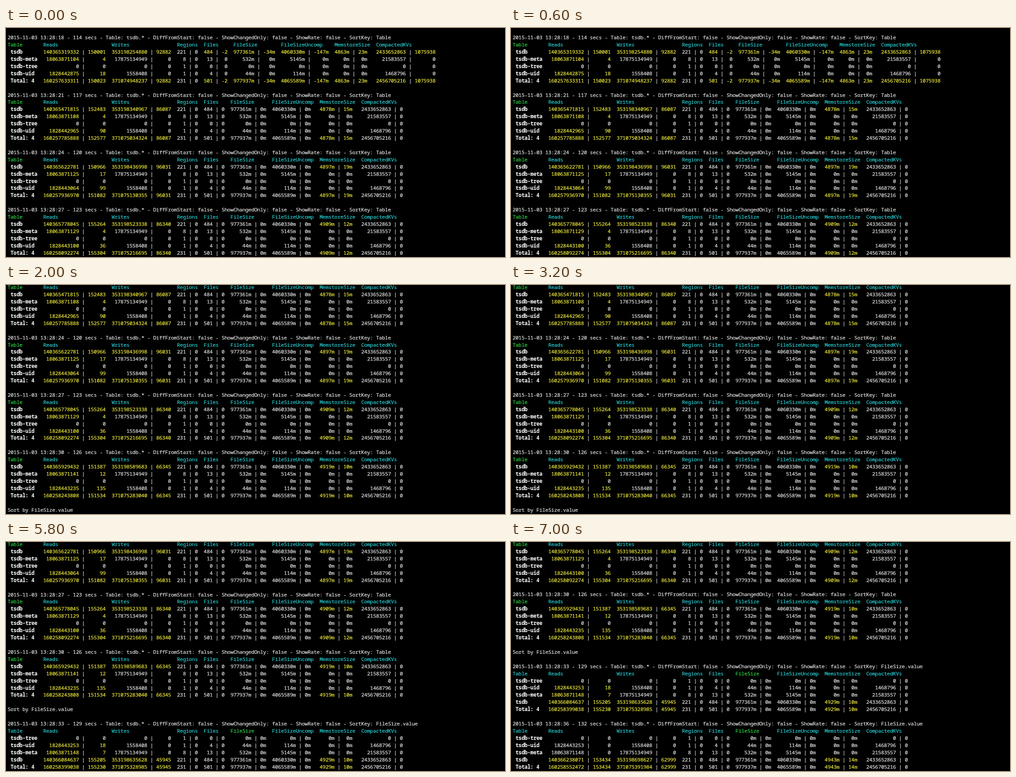
An HTML page that plays this animation: 1102 by 508 pixels, repeating every 8 s.

```html
<!DOCTYPE html>
<html lang="en">
<head>
<meta charset="utf-8">
<title>Table statistics</title>
<style>
  html, body { margin: 0; width: 100%; height: 100%; overflow: hidden; background: #000; }
  #screen { position: relative; width: 100%; height: 100%; overflow: hidden; contain: strict; }
  #log {
    --row: 15.93px;
    position: absolute;
    left: 3.5px;
    margin-top: -2.8px;
    font: 11.5px/var(--row) "Noto Sans Mono", "DejaVu Sans Mono", monospace;
    letter-spacing: -0.338px;
    -webkit-text-stroke: 0.2px;
    font-variant-ligatures: none;
    color: #e4e4e4;
    white-space: pre;
    animation: scroll 8s step-end infinite;
  }
  #log div { height: var(--row); }
  #log b { color: #fff; -webkit-text-stroke: 0; }
  .head { color: #28d2d6; }
  .sort { color: #30d648; }
  .diff { color: #efeb3c; }
  @keyframes scroll {
    0%    { top: 0; }
    12.5% { top: calc(var(--row) * -8); }
    25%   { top: calc(var(--row) * -10); }
    50%   { top: calc(var(--row) * -18); }
    87.5% { top: calc(var(--row) * -26); }
  }
</style>
</head>
<body>
<div id="screen"><div id="log"></div></div>
<script>
const columns = ['Reads', 'Writes', 'Regions', 'Files', 'FileSize', 'FileSizeUncomp', 'MemstoreSize', 'CompactedKVs'];
const unit = col => col.endsWith('Size') || col === 'FileSizeUncomp' ? 'm' : '';

// Counters as they stand at the first report; missing ones are zero
const tables = {
  'tsdb': { Reads: 140365319332, Writes: 353198254880, Regions: 221, Files: 484, FileSize: 977361,
    FileSizeUncomp: 4060330, MemstoreSize: 4863, CompactedKVs: 2433652863 },
  'tsdb-meta': { Reads: 18063871104, Writes: 17875134949, Regions: 8, Files: 13, FileSize: 532,
    FileSizeUncomp: 5145, CompactedKVs: 21583557 },
  'tsdb-tree': { Regions: 1 },
  'tsdb-uid': { Reads: 1828442875, Writes: 1558408, Regions: 1, Files: 4, FileSize: 44,
    FileSizeUncomp: 114, CompactedKVs: 1468796 }
};

// Growth of the moving counters, one entry per report
const growth = {
  'tsdb': {
    Reads: [150001, 152483, 150966, 155264, 151387, 155205, 153434],
    Writes: [92882, 86087, 96031, 86340, 66345, 45945, 62999],
    MemstoreSize: [23, 15, 19, 12, 10, 10, 14],
    Files: [-2], FileSize: [-34], FileSizeUncomp: [-147], CompactedKVs: [1075938]
  },
  'tsdb-meta': { Reads: [4, 4, 17, 4, 12, 7] },
  'tsdb-uid': { Reads: [18, 90, 99, 36, 135, 18] }
};

const lines = [];
const span = (cls, text) => `<span class="${cls}">${text}</span>`;

function stat(name, col, index) {
  const series = growth[name]?.[col] || [];
  const since = series.slice(1, index + 1).reduce((a, b) => a + b, 0);
  return { value: (tables[name][col] || 0) + since, delta: series[index] || 0 };
}

function report(index, sortKey) {
  const rows = Object.keys(tables).map(name =>
    ({ name, stats: columns.map(col => stat(name, col, index)) }));
  const total = (c, key) => rows.reduce((sum, row) => sum + row.stats[c][key], 0);
  const totals = columns.map((_, c) => ({ value: total(c, 'value'), delta: total(c, 'delta') }));
  const sortCol = columns.indexOf(sortKey);
  if (sortCol >= 0) rows.sort((a, b) => a.stats[sortCol].value - b.stats[sortCol].value);
  rows.push({ name: 'Total: 4', stats: totals });

  const layout = columns.map((col, c) => {
    const widest = key => Math.max(...rows.map(r => (r.stats[c][key] + unit(col)).length));
    const value = widest('value'), delta = widest('delta');
    return { value, delta, all: Math.max(col.length, value + 3 + delta) };
  });
  const heading = (name, width) =>
    span(name === sortKey ? 'sort' : 'head', name) + ' '.repeat(width - name.length);

  function cell(stat, c) {
    const { value, delta, all } = layout[c];
    const show = (key, width) => {
      const text = (stat[key] + unit(columns[c])).padStart(width);
      return stat.delta ? span('diff', text) : text;
    };
    return `${show('value', value)} | ${show('delta', delta)}` + ' '.repeat(all - value - delta - 3);
  }

  const seconds = index * 3;
  lines.push('',
    `2015-11-03 13:28:${18 + seconds} - ${114 + seconds} secs - Table: tsdb.* - DiffFromStart: false - ` +
    `ShowChangedOnly: false - ShowRate: false - SortKey: ${sortCol < 0 ? sortKey : sortKey + '.value'}`,
    [heading('Table', 10), ...columns.map((col, c) => heading(col, layout[c].all))].join('  '),
    ...rows.map(row => [` <b>${row.name.padEnd(9)}</b>`, ...row.stats.map(cell)].join('  ')));
}

for (let i = 0; i < 5; i++) report(i, 'Table');
lines.push('', 'Sort by FileSize.value');
for (let i = 5; i < 7; i++) report(i, 'FileSize');

document.getElementById('log').innerHTML = lines.map(line => `<div>${line}</div>`).join('');
</script>
</body>
</html>
```
